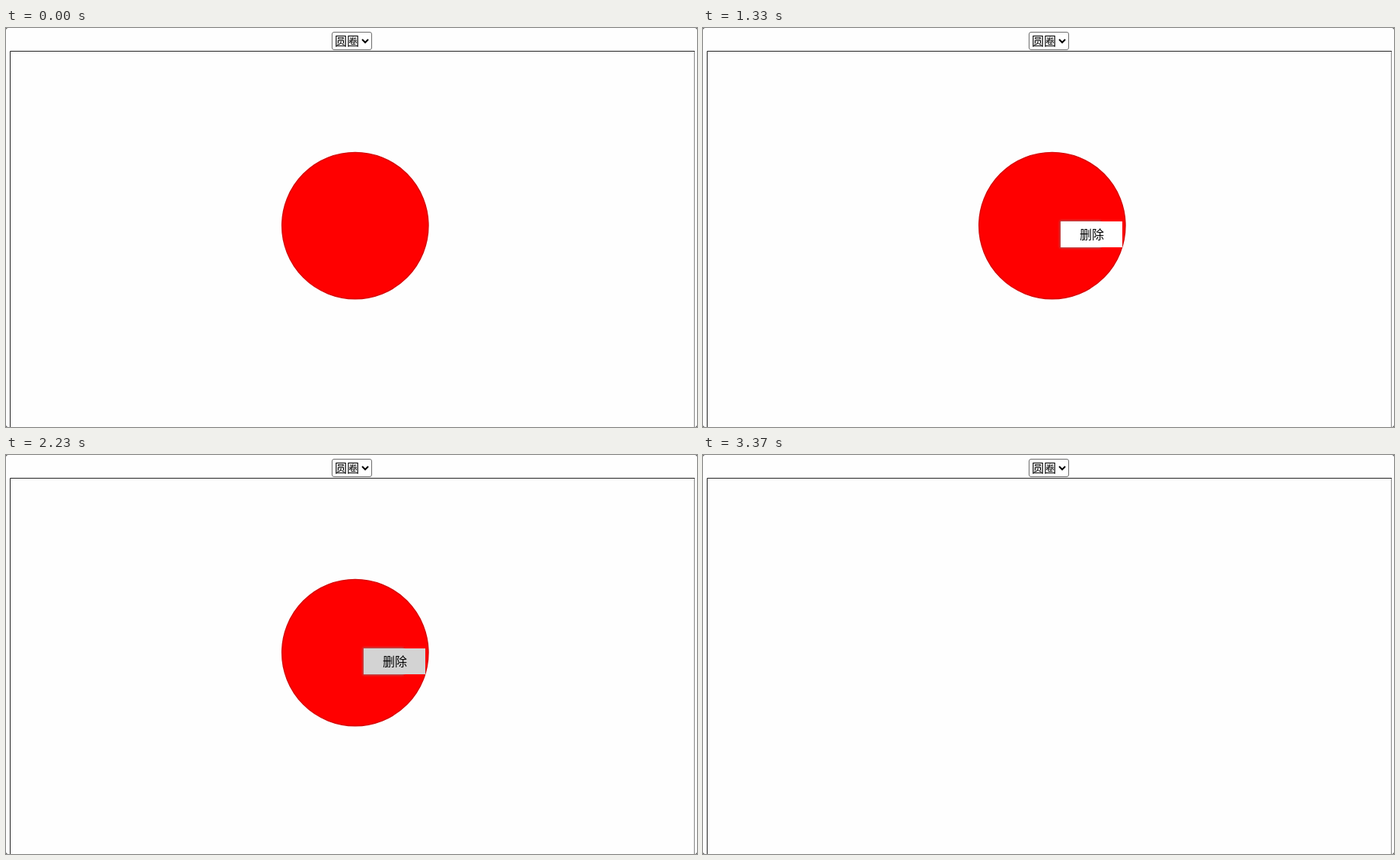
Animation, 908 px wide and 524 px high, one loop 3.99 s. Source, as an HTML page:

```html
<!DOCTYPE html>
<html lang="zh-CN">
<head>
<meta charset="utf-8">
<style>
  html, body { margin: 0; width: 100%; height: 100%; overflow: hidden; background: #444; }
  svg { display: block; width: 908px; height: 524px; }
  text { font: 500 16px "Noto Sans CJK SC", "Noto Sans CJK", sans-serif; }
</style>
</head>
<body>
<svg viewBox="0 0 908 524">
  <defs>
    <filter id="blur" x="-20%" y="-30%" width="140%" height="160%">
      <feGaussianBlur stdDeviation="1.7"/>
    </filter>
  </defs>
  <rect width="908" height="524" rx="3" fill="#fefefe"/>

  <rect x="428.5" y="5.5" width="52" height="23" rx="2.5" fill="#fff" stroke="#6b6b6b"/>
  <text x="432" y="23">圆圈</text>
  <path d="M468 15l4 4 4-4" fill="none" stroke="#000" stroke-width="2"/>

  <path d="M5.5 524V30.5H905" fill="none" stroke="#222"/>
  <path d="M904.5 31V524" stroke="#858585"/>

  <circle id="disc" cx="458.8" cy="259.6" r="96.2" fill="#f00" stroke="#d40808" stroke-width="1.4"/>

  <g id="menu">
    <rect x="469" y="253" width="54" height="36" fill="#888" opacity=".8" filter="url(#blur)"/>
    <rect id="item" x="470" y="254" width="81" height="34"/>
    <text x="495" y="277">删除</text>
  </g>
</svg>
<script>
  const LOOP = 3990, MENU_OPEN = 1330, HOVER = 1890, DELETED = 2450;
  const [disc, menu, item] = ["disc", "menu", "item"].map(id => document.getElementById(id));
  const show = (node, visible) => node.setAttribute("visibility", visible ? "visible" : "hidden");
  const start = performance.now();

  function draw() {
    const t = (performance.now() - start) % LOOP;
    show(disc, t < DELETED);
    show(menu, t >= MENU_OPEN && t < DELETED);
    item.setAttribute("fill", t < HOVER ? "#fff" : "#d3d3d3");
    requestAnimationFrame(draw);
  }
  draw();
</script>
</body>
</html>
```
